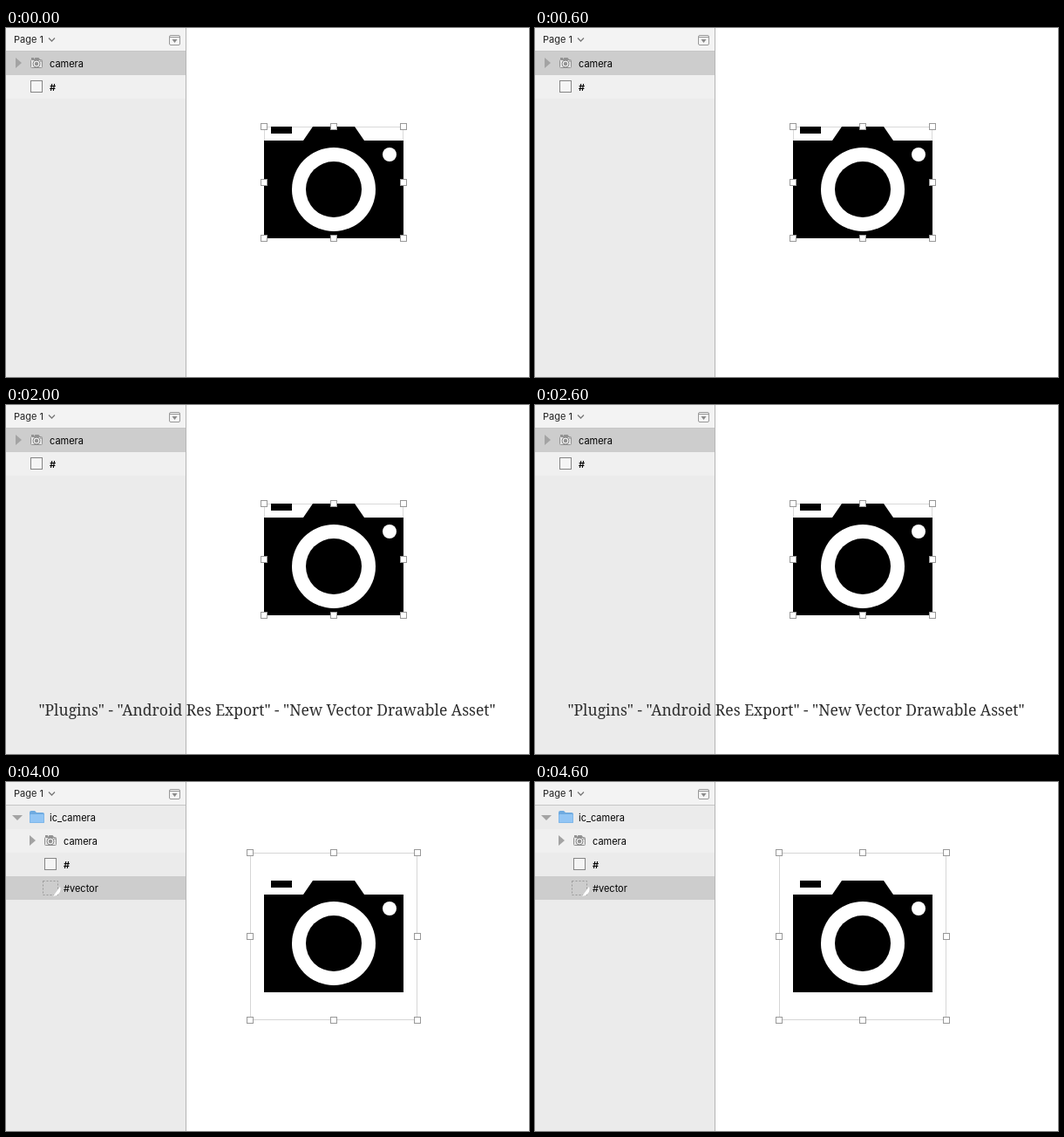
An HTML page for the animation above (5 s loop, 600 by 400 pixels).

```html
<!DOCTYPE html>
<html lang="en">
<head>
<meta charset="utf-8">
<title>Vector drawable export</title>
<style>
html, body { margin: 0; width: 100%; height: 100%; overflow: hidden; background: #fff; }
svg { display: block; width: 600px; height: 400px; }
text { font: 11px Inter, "Noto Sans", sans-serif; white-space: pre; }
.bold { font-weight: 600; }
.italic { font-style: italic; }
.title { font-size: 12px; font-weight: 700; }
.control { font-size: 12.5px; }
.caption { font: 500 17.5px "Noto Serif", serif; text-anchor: middle; }
.dialog { filter: drop-shadow(0 8px 12px rgba(0, 0, 0, .38)); }
.popover { filter: drop-shadow(0 2px 4px rgba(0, 0, 0, .4)); }
.scene { display: none; }
</style>
</head>
<body>
<svg id="stage" viewBox="0 0 600 400" xmlns="http://www.w3.org/2000/svg"></svg>
<script>
const STEP = 1000;

const rect = (x, y, w, h, fill, extra = '') =>
  `<rect x="${x}" y="${y}" width="${w}" height="${h}" fill="${fill}" ${extra}/>`;
const box = (x, y, w, h, fill, stroke, r = 0, extra = '') =>
  rect(x + .5, y + .5, w - 1, h - 1, fill, `stroke="${stroke}" rx="${r}" ${extra}`);
const circle = (x, y, r, fill, extra = '') =>
  `<circle cx="${x}" cy="${y}" r="${r}" fill="${fill}" ${extra}/>`;
const shape = (d, fill) => `<path d="${d}" fill="${fill}"/>`;
const line = (d, color, width = 1, extra = '') =>
  `<path d="${d}" fill="none" stroke="${color}" stroke-width="${width}" ${extra}/>`;
const text = (x, y, s, cls = '', fill = '#000') =>
  `<text x="${x}" y="${y}" class="${cls}" fill="${fill}">${s}</text>`;
const move = (x, y, body) => `<g transform="translate(${x} ${y})">${body}</g>`;

// Canvas artwork
const camera = (x, y) => move(x, y,
  shape('M0 16H45L56 0H104L115 16H160V128H0Z', '#000') +
  rect(8, 0, 24, 8, '#000') +
  circle(80, 72, 48, '#fff') + circle(80, 72, 32, '#000') + circle(144, 32, 8, '#fff'));

function handles(x, y, w, h) {
  let out = '';
  for (const i of [0, .5, 1])
    for (const j of [0, .5, 1])
      if (i !== .5 || j !== .5)
        out += box(x + i * w - 4, y + j * h - 4, 8, 8, '#fff', '#999');
  return out;
}

const selectedCamera = (x, y) =>
  box(x, y, 160, 128, 'none', '#d9d9d9') + camera(x, y) + handles(x, y, 160, 128);

// Layer list
const closed = (x, y) => shape(`M${x} ${y - 6}L${x + 7} ${y}L${x} ${y + 6}Z`, '#a3a3a3');
const square = (x, y) => box(x, y, 14, 14, '#f5f5f5', '#858585');

const cameraIcon = (x, y) => move(x, y,
  box(0, 2, 14, 10, '#e5e5e5', '#929292', 1) +
  rect(1, 0, 3, 2, '#929292') + shape('M4 2L5.5 0H9.5L11 2Z', '#929292') +
  circle(7, 7, 4, '#f3f3f3', 'stroke="#868686"') + circle(7, 7, 2.2, '#929292') +
  circle(12, 4, .8, '#777'));

const folder = shape('M27 35Q27 33 29 33H33L35 35H42Q44 35 44 37V46Q44 47 43 47H28Q27 47 27 46Z', '#6eaae0') +
  rect(27.5, 37, 16, 9.5, '#92c5f4', 'rx="1"');

const slice = box(42, 113, 18, 17, 'none', '#999', 0, 'stroke-dasharray="2 2"') +
  shape('M54 131L62 120Q64 126 58 130Z', '#fff');

const sidebar = rows =>
  rect(0, 0, 206, 400, '#ebebeb') + rect(0, 0, 206, 26, '#f3f3f3') +
  rows.map((fill, i) => rect(0, 27 + 27 * i, 206, 27, fill)).join('') +
  rect(0, 26, 206, 1, '#c6c6c6') + rect(206, 0, 1, 400, '#b5b5b5') +
  text(9, 17, 'Page 1', '', '#222') + line('M49 11.5L52.5 15L56 11.5', '#777', 1.3) +
  box(187, 8, 13, 12, '#f5f5f5', '#989898', 1.5) + rect(187, 10, 13, 1, '#989898') +
  shape('M190.5 13H196.5L193.5 17Z', '#8a8a8a');

const flatLayers = rows => sidebar(rows) +
  closed(11, 40) + cameraIcon(28, 34) + text(50, 45, 'camera') +
  square(28, 60) + text(50, 72, '#', 'bold');

const groupedLayers = sidebar(['#ebebeb', '#f0f0f0', '#ebebeb', '#cdcdcd']) +
  shape('M7 38H19L13 44Z', '#a3a3a3') + folder + text(50, 45, 'ic_camera') +
  closed(27, 67) + cameraIcon(44, 61) + text(66, 72, 'camera') +
  square(44, 87) + text(66, 99, '#', 'bold') +
  slice + text(66, 126, '#vector');

// Inspector
const stepper = (x, y) =>
  line(`M${x - 3} ${y - 2}L${x} ${y - 5}L${x + 3} ${y - 2}M${x - 3} ${y + 2}L${x} ${y + 5}L${x + 3} ${y + 2}`, '#333', 1.4);
const field = (y, s) => box(551, y, 43, 19, '#fff', '#b8b8b8') + text(555, y + 14, s);
const select = (x, y, w, h, s) =>
  box(x, y, w, h, '#fff', '#bdbdbd', 3.5) + text(x + 9, y + h / 2 + 4, s) + stepper(x + w - 8, y + h / 2);
const knob = (x, y) => circle(x, y, 5.5, '#fff', 'stroke="#b0b0b0"');
const plus = y => line(`M581.5 ${y}H592.5M587 ${y - 5.5}V${y + 5.5}`, '#8c8c8c', 1.7);
const check = (x, y) => box(x, y, 11, 11, '#fff', '#aaa', 2);

const gear = Array.from({ length: 8 }, (_, i) =>
  rect(566, 139, 2, 4, '#858585', `transform="rotate(${i * 45} 567 145)"`)).join('') +
  circle(567, 145, 3.2, 'none', 'stroke="#858585" stroke-width="2.4"');

const section = (y, s) => rect(390, y, 210, 1, '#cbcbcb') +
  text(397, y + 17, s, 'bold', '#666');

const inspector = rect(390, 0, 210, 400, '#e6e6e6') + rect(389, 0, 1, 400, '#b5b5b5') +
  text(397, 16, 'Radius') + rect(461, 10, 80, 3, '#b4b4b4', 'rx="1.5"') + knob(466, 11.5) + field(2, '0') +
  rect(390, 29, 210, 38, '#fff') + rect(390, 29, 210, 1, '#cdcdcd') + rect(390, 66, 210, 1, '#cdcdcd') +
  text(400, 52, 'No Shared Style', 'italic') + stepper(588.5, 48) +
  text(397, 89, 'Opacity') + rect(461, 83, 75, 3, '#3f96ea', 'rx="1.5"') + knob(535.5, 84.5) + field(75, '100%') +
  text(397, 116, 'Blending') + select(460, 102, 134, 21, 'Normal') +
  rect(390, 131, 210, 27, 'url(#band)') + section(131, 'Fills') + rect(390, 157, 210, 1, '#cbcbcb') +
  gear + plus(145) +
  check(397, 172) + line('M399.5 177.5L402 180L406 174.5', '#333', 1.5) +
  box(416, 166, 35, 21, '#fff', '#b8b8b8', 3) + rect(420, 170, 26, 13, '#000') +
  select(460, 167, 82, 20, 'Normal') + field(167, '100%') + text(551, 200, 'Opacity') +
  [['Borders', 210], ['Shadows', 236], ['Inner Shadows', 262], ['Gaussian Blur', 288]]
    .map(([s, y]) => section(y, s)).join('') +
  rect(390, 314, 210, 1, '#cbcbcb') +
  plus(223) + plus(249) + plus(275) + check(583, 295);

const help = [
  [222, 'Determines how to fill shapes'], [236, 'with overlapping paths.'],
  [264, 'Non-Zero will fill the entire'], [278, 'shape, whilst Even-Odd will'],
  [292, 'preserve the holes in'], [306, 'overlapping paths.']
];
const popover = '<g class="popover">' +
  shape('M416 173H557L567 164L577 173Q582 174 582 179V317Q582 323 576 323H416Q410 323 410 317V179Q410 173 416 173Z', 'rgba(253,253,253,.96)') +
  '</g>' + select(418, 181, 157, 21, 'Non-Zero') +
  help.map(([y, s]) => text(418, y, s, '', '#333')).join('');

// Dialog
const button = (x, tx, s) => box(x, 252, 80, 22, 'url(#button)', '#c3c3c3', 4) +
  text(tx, 268, s, 'control', '#333');

const dialog = '<g class="dialog">' + rect(155, 107, 357, 187, '#ececec', 'rx="5"') + '</g>' +
  shape('M155 128V112Q155 107 160 107H507Q512 107 512 112V128Z', '#f5f5f5') +
  rect(155, 128, 357, 1, '#d5d5d5') + rect(155, 129, 357, 54, '#fff') + rect(155, 183, 357, 1, '#b9b9b9') +
  rect(155.5, 107.5, 356, 186, 'none', 'rx="5" stroke="#999" stroke-opacity=".5"') +
  circle(191, 157.5, 15, '#fdad00') +
  text(214, 154, 'User Input', 'title') +
  text(214, 168, 'Asset name for new vector drawable.', '', '#808080') +
  rect(172, 200, 323, 28, '#94c3f3', 'rx="3"') + box(175, 203, 317, 22, '#fff', '#6fa8e2') +
  text(179, 220, 'ic_camera', 'control') +
  button(324, 343, 'Cancel') + button(412, 443, 'OK');

const frame = (x, y, color, dash) =>
  box(x, y, 192, 192, 'none', color, 0, dash ? `stroke-dasharray="${dash}"` : '');

const overview = flatLayers(['#cdcdcd', '#f0f0f0']) + selectedCamera(296, 113);

const scenes = [
  overview,
  frame(103, 51, '#d2d2d2', '4 3') + selectedCamera(119, 83) + inspector + popover,
  overview + text(299.5, 356, '"Plugins" - "Android Res Export" - "New Vector Drawable Asset"', 'caption', '#2e2e2e'),
  flatLayers(['#cdcdcd', '#cdcdcd']) + frame(280, 81, '#bdbdbd') + handles(280, 81, 192, 192) + dialog,
  groupedLayers + frame(280, 81, '#adadad', '1 1') + camera(296, 113) + handles(280, 81, 192, 192)
];

const defs = `<defs>
  <linearGradient id="band"><stop stop-color="#e2e2e2"/><stop offset="1" stop-color="#f3f3f3"/></linearGradient>
  <linearGradient id="button" x2="0" y2="1"><stop stop-color="#fff"/><stop offset="1" stop-color="#f4f4f4"/></linearGradient>
</defs>`;

const stage = document.getElementById('stage');
stage.innerHTML = defs + scenes.map(s => `<g class="scene">${s}</g>`).join('');
const layers = [...stage.querySelectorAll('.scene')];

const start = performance.now();
function draw() {
  const now = Math.floor((performance.now() - start) / STEP) % layers.length;
  layers.forEach((layer, i) => { layer.style.display = i === now ? 'inline' : 'none'; });
  requestAnimationFrame(draw);
}
draw();
</script>
</body>
</html>
```
